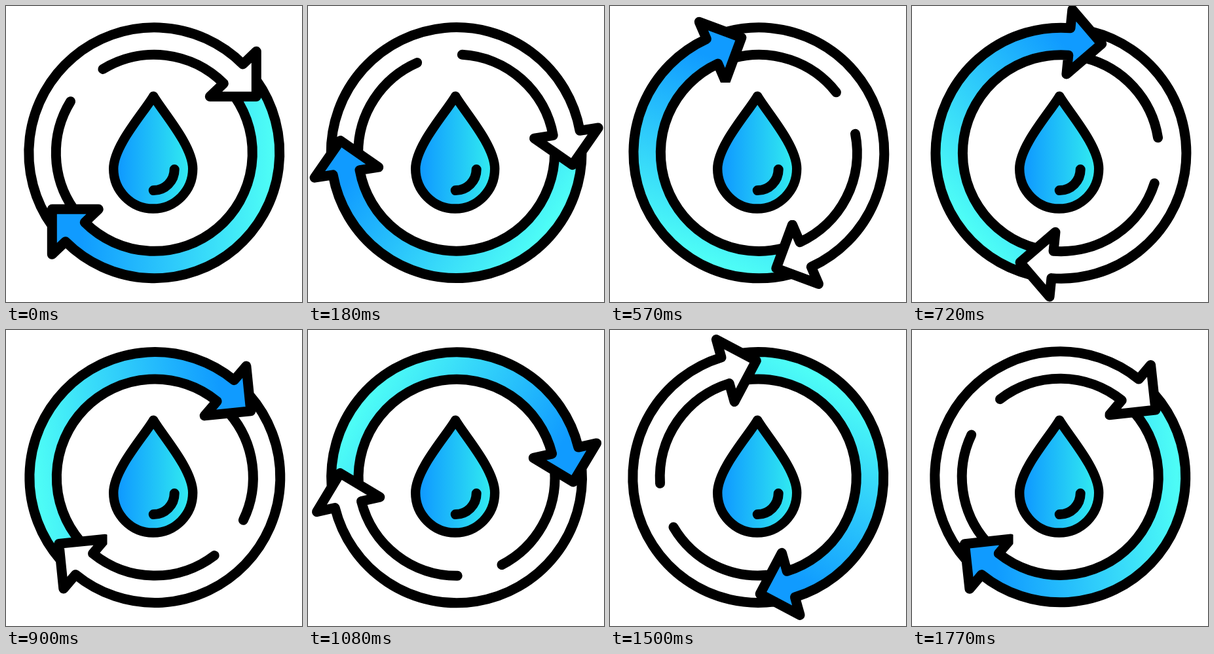
Write an HTML page that moves like this. It is 452 px wide and 452 px high and loops after 1.8 s.

```html
<!DOCTYPE html>
<html lang="en">
<head>
<meta charset="utf-8">
<title>Water cycle</title>
<style>
  html, body { margin: 0; width: 100%; height: 100%; overflow: hidden; background: #fff; }
  svg { display: block; width: 100vw; height: 100vh; }
  .line { fill: none; stroke: #000; stroke-width: 15; stroke-linecap: round; stroke-linejoin: round; }
  .drop { fill: url(#water); stroke-width: 14.4; }
</style>
</head>
<body>
<svg viewBox="0 0 452 452">
  <defs>
    <linearGradient id="band" gradientUnits="userSpaceOnUse" x1="-112" y1="0" x2="186" y2="0">
      <stop offset="0" stop-color="#109bff"/>
      <stop offset="1" stop-color="#4ffff6"/>
    </linearGradient>
    <linearGradient id="water" gradientUnits="userSpaceOnUse" x1="175" y1="0" x2="276" y2="0">
      <stop offset="0" stop-color="#109cff"/>
      <stop offset="1" stop-color="#30e8f1"/>
    </linearGradient>
  </defs>
  <g id="ring">
    <path id="fill" fill="url(#band)"/>
    <path id="lines" class="line"/>
  </g>
  <rect x="154.5" y="117" width="140" height="210" fill="#fff"/>
  <g transform="translate(.2 .6)">
    <path class="line drop"
      d="M225 137C212 160 164 212 164 248A60.5 61 0 0 0 285 248C285 212 238 160 225 137Z"/>
    <path class="line" d="M257 249A32 32 0 0 1 225 281"/>
  </g>
</svg>
<script>
  const OUTER = 191.5, INNER = 150;
  const FRAME = 30, FRAMES = 60, HALF = 31;
  const $ = id => document.getElementById(id);

  const point = (r, deg) => {
    const a = deg * Math.PI / 180;
    return `${(r * Math.cos(a)).toFixed(2)} ${(r * Math.sin(a)).toFixed(2)}`;
  };
  // Arc continuing from the current point
  const arcTo = (r, to, sweep = 1) => `A${r} ${r} 0 0 ${sweep} ${point(r, to)}`;
  const arc = (r, from, to) => `M${point(r, from)}${arcTo(r, to)}`;

  // Arrowhead from outer notch to inner notch; side is 1 or -1
  const head = side => {
    const corners = [[156, -155], [156, -86], [85, -86]];
    return corners.map(([x, y]) => `L${x * side} ${y * side}`).join('') +
      `L${point(INNER, side > 0 ? 315 : 135)}`;
  };

  $('fill').setAttribute('d',
    arc(OUTER, -35.5, 135) + head(-1) + arcTo(INNER, -35, 0) + 'L156 -86Z');

  $('lines').setAttribute('d',
    arc(OUTER, -35.5, 135) + head(-1) + arcTo(INNER, -35, 0) +
    arc(OUTER, 144.5, 315) + head(1) + arcTo(INNER, 238.5, 0) +
    arc(INNER, 145, 211.6));

  // The second half turn is slightly quicker than the first
  const angleAt = n => n < HALF
    ? 180 * n / HALF
    : 180 + 180 * (n - HALF) / (FRAMES - HALF);

  // The ring sits slightly off its pivot, so it wobbles as it turns
  const start = performance.now();
  function draw(now) {
    const n = Math.floor(Math.max(0, now - start) / FRAME) % FRAMES;
    $('ring').setAttribute('transform',
      `translate(226.8 224.7) rotate(${angleAt(n)}) translate(-.5 -.4)`);
    requestAnimationFrame(draw);
  }
  draw(start);
</script>
</body>
</html>
```
